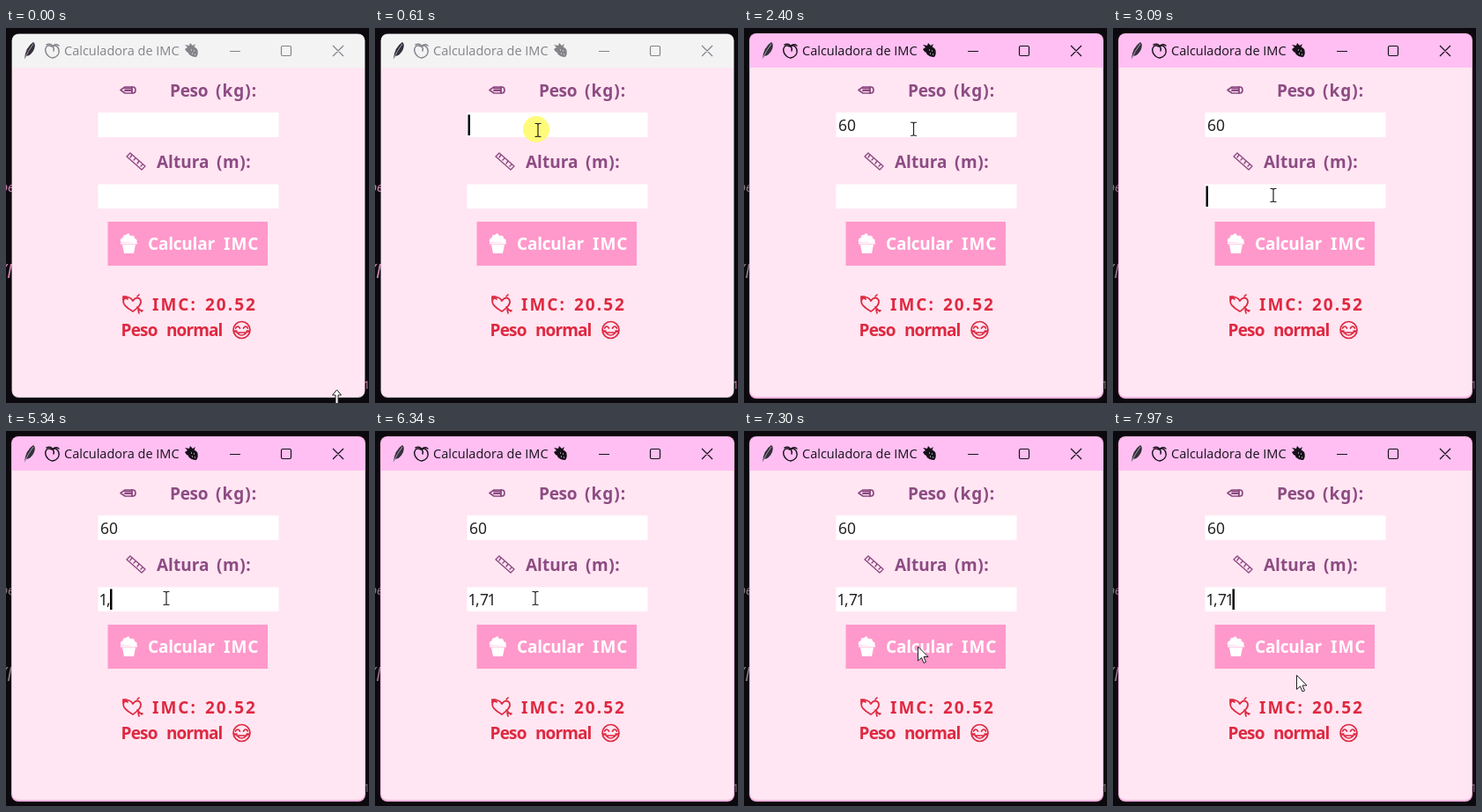
These frames come from a looping animation (412 by 426 pixels, 8 s). An HTML page:

```html
<!DOCTYPE html>
<html lang="pt">
<head>
<meta charset="utf-8">
<title>Calculadora de IMC</title>
<style>
html, body { margin: 0; width: 100%; height: 100%; overflow: hidden; background: #0b090d; }
svg { display: block; width: 412px; height: 426px; }
text { white-space: pre; }
.bold { font: 700 19px 'Noto Sans', sans-serif; }
.entry { font: 17.5px 'Noto Sans', sans-serif; fill: #222; }
.line { fill: none; stroke: currentColor; stroke-width: 1.7; stroke-linecap: round; stroke-linejoin: round; }
</style>
</head>
<body>
<svg viewBox="0 0 412 426">
  <rect width="412" height="426" fill="#0b090d"/>
  <g id="behind" font-family="Noto Sans, sans-serif" font-style="italic">
    <text x="-6" y="186" font-size="14">pe</text>
    <text x="-5" y="284" font-size="21">(M</text>
    <text x="406" y="410" font-size="12" font-style="normal">1</text>
  </g>

  <rect id="frame" rx="8"/>
  <path id="bar" d="M7 45V15Q7 7 15 7H399Q407 7 407 15V45Z"/>
  <path d="M7 45H407V411Q407 419 399 419H15Q7 419 7 411Z" fill="#ffe6f2"/>

  <g id="title">
    <path d="M21 35Q22 22 31 16Q34 18 32 24Q29 31 23 32Z" fill="#34303a"/>
    <path d="M21 35Q25 26 31 18" fill="none" stroke="#aaa3b4"/>
    <g class="line" style="stroke-width:1.4">
      <path d="M52 21C46 18 44 23 45 27C46 31 50 34 53 34C57 33 61 30 60 25C59 20 55 19 52 21Z"/>
      <path d="M46 19Q51 17 53 21Q56 17 60 20M53 21Q55 23 54 26"/>
    </g>
    <text x="66" y="31" font-family="Open Sans, sans-serif" font-size="14.5" fill="currentColor">Calculadora de IMC</text>
    <g fill="currentColor">
      <path d="M207 22Q213 19 217 24Q219 29 216 33Q210 33 207 29Z"/>
      <path d="M203 24L206 22L203 19L208 20L209 17L212 20L215 18L213 23L207 28L205 27Z"/>
    </g>
    <path d="M210 25h1M213 26h1M211 29h1M214 30h1" stroke="#fff"/>
    <path d="M254 26.5H266M314 20.5H322Q323.500 20.500 323.500 22V30Q323.500 31.500 322 31.500H314Q312.500 31.500 312.500 30V22Q312.500 20.500 314 20.500ZM371 20L383 32M383 20L371 32" fill="none" stroke="currentColor" stroke-width="1.2"/>
  </g>

  <g fill="#fff">
    <rect x="104.500" y="96" width="205" height="28"/>
    <rect x="104.500" y="177.500" width="205" height="27.500"/>
  </g>
  <rect id="button" x="115.500" y="220" width="181.500" height="50"/>

  <g color="#8d4b83">
    <g class="line">
      <path d="M130 70.500L135 67H144Q147 67 147 70.500Q147 74 144 74H135Z"/>
      <path d="M135 68.500H143M135 71H143M143 67V74" stroke-width="1.900"/>
      <path d="M137 146L141 142L158 157L154 161ZM143 144L141 147M147 148L145 150M151 151L149 154M155 155L153 157" stroke-width="1.400"/>
    </g>
  </g>
  <g fill="#fff">
    <path d="M130 243Q129 239 133 238Q132 235 136 235L139 233L141 236Q146 235 146 239Q150 240 148 244Z"/>
    <path d="M132 246H147L145 256H134Z"/>
    <path d="M130 244.500H149" stroke="#fff" stroke-width="2"/>
  </g>
  <g class="line" color="#df2941">
    <path d="M144 322C137 318 131 313 134 308C137 304 142 306 144 310C147 305 152 306 153 310C154 315 148 319 144 322Z"/>
    <path d="M133 305L138 308M133 305V309M133 305H137M149 317L154 322M151 324L150 320L155 321M149 305L151 303"/>
    <circle cx="267.500" cy="343" r="9.500"/>
    <path d="M260.500 341Q263 337 265.500 341M269.500 341Q272 337 274.500 341M262 346Q267.500 352 273 346Z"/>
    <path d="M259.500 344.500h2M273.500 344.500h2" stroke-width="2.500"/>
  </g>
  <g id="words" class="bold"></g>

  <g id="weight" class="entry"></g>
  <g id="height" class="entry"></g>
  <rect id="caret" width="2.500" height="23.500" fill="#000"/>
  <circle id="halo" r="15" fill="#fffb6b" fill-opacity=".9"/>
  <g id="pointers">
    <path id="arrow" d="M0 0V16L4 12.500L6.500 18.500L9 17.500L6.500 11.500H11.500Z" fill="#fff" stroke="#222"/>
    <path id="beam" d="M-3.500 -7.500H-1L0 -6.500L1 -7.500H3.500M0 -6.500V6.500M-3.500 7.500H-1L0 6.500L1 7.500H3.500" fill="none" stroke="#222" stroke-width="1.200"/>
    <path id="resize" d="M0 -11L5 -5H1.500V5H5L0 11L-5 5H-1.500V-5H-5Z" fill="#fff" stroke="#222"/>
  </g>
</svg>
<script>
const $ = id => document.getElementById(id);
const set = (el, attrs) => { for (const k in attrs) el.setAttribute(k, attrs[k]); };
const show = (el, on) => el.setAttribute('visibility', on ? 'visible' : 'hidden');
const between = (t, spans) => spans.some(([a, b]) => t >= a && t < b);

function addText(parent, str, x, y, attrs = {}) {
  const el = document.createElementNS('http://www.w3.org/2000/svg', 'text');
  el.textContent = str;
  set(el, { x, y, ...attrs });
  parent.append(el);
  return el;
}

const PURPLE = '#8d4b83', RED = '#df2941';
for (const [str, x, y, fill, spacing] of [
  ['Peso', 186, 78, PURPLE, -.3], ['(kg):', 238, 78, PURPLE, 1],
  ['Altura', 171, 159, PURPLE, 0], ['(m):', 239, 159, PURPLE, .6],
  ['Calcular', 161, 252, '#fff', -.2], ['IMC', 247, 252, '#fff', 1],
  ['IMC:', 166, 321, RED, 2], ['20.52', 226, 321, RED, 2],
  ['Peso', 130.5, 350, RED, -.8], ['normal', 182, 350, RED, -.9]
]) addText($('words'), str, x, y, { fill, 'letter-spacing': spacing });

// Typed characters: [character, x, time typed]
const typeInto = (id, y, keys) =>
  keys.map(([ch, x, at]) => ({ el: addText($(id), ch, x, y), at }));
const typed = [
  ...typeInto('weight', 116.5, [['6', 107, 1740], ['0', 117, 2070]]),
  ...typeInto('height', 197.5, [['1', 105.5, 4810], [',', 114, 5340], ['7', 119, 6070], ['1', 127.5, 6340]])
];

// Caret places: [time, x, y]
const caretStops = [[0, 105.5, 98.5], [1740, 115.5, 98.5], [2070, 126, 98.5], [2940, 105.5, 179.5],
  [4810, 113, 179.5], [5340, 118, 179.5], [6070, 128, 179.5], [6340, 135.5, 179.5]];
const caretOn = [[610, 1210], [1540, 2140], [2470, 3560], [3890, 4480], [4810, 5400],
  [5670, 6270], [6610, 7230], [7560, 8000]];

// Pointer path: [time, x, y]
const path = [[0, 375.5, 422], [60, 375.5, 422], [140, 330, 345], [210, 265, 240], [270, 215, 162],
  [340, 190, 126], [470, 190, 126], [550, 185, 116], [690, 185, 116], [750, 187, 117],
  [2380, 187, 117], [2540, 229, 100], [2650, 224, 125], [2800, 188, 183], [2870, 182, 190],
  [6590, 182, 190], [6740, 189, 212], [6900, 197.5, 245], [7710, 197.5, 245], [7970, 208.5, 277.5]];
const clicks = [[550, 880, 183, 115], [2870, 3090, 181, 189], [6950, 7160, 197, 245]];

function pointerAt(t) {
  const i = path.findIndex(p => p[0] > t);
  if (i < 0) return path.at(-1).slice(1);
  const [t0, x0, y0] = path[i - 1], [t1, x1, y1] = path[i];
  const k = (t - t0) / (t1 - t0);
  return [x0 + (x1 - x0) * k, y0 + (y1 - y0) * k];
}

function drawWindow(focused) {
  set($('frame'), focused
    ? { x: 6, y: 6, width: 402, height: 415, fill: '#f3b3df' }
    : { x: 6.5, y: 6.5, width: 401, height: 413.5, fill: '#c9bec5' });
  set($('bar'), { fill: focused ? '#ffbff2' : '#f3f3f3' });
  set($('title'), { color: focused ? '#17111a' : '#85828a' });
  set($('behind'), { fill: focused ? '#8b7885' : '#d783b5' });
}

function draw(t) {
  drawWindow(t >= 690);
  typed.forEach(({ el, at }) => show(el, t >= at));

  const [, cx, cy] = caretStops.findLast(s => t >= s[0]);
  set($('caret'), { x: cx, y: cy });
  show($('caret'), between(t, caretOn));
  set($('button'), { fill: between(t, [[6950, 7090]]) ? '#ff8ac2' : '#ff99cb' });

  const click = clicks.find(([a, b]) => t >= a && t < b);
  if (click) set($('halo'), { cx: click[2], cy: click[3] });
  show($('halo'), click);

  const [x, y] = pointerAt(t);
  const overEntry = x > 104 && x < 310 && (y > 96 && y < 124 || y > 177 && y < 205);
  const kind = t < 70 ? 'resize' : overEntry ? 'beam' : 'arrow';
  for (const id of ['arrow', 'beam', 'resize']) show($(id), id === kind);
  set($('pointers'), { transform: `translate(${x} ${y})` });
}

const start = performance.now();
function tick() {
  draw((performance.now() - start) % 8000);
  requestAnimationFrame(tick);
}
tick();
</script>
</body>
</html>
```
